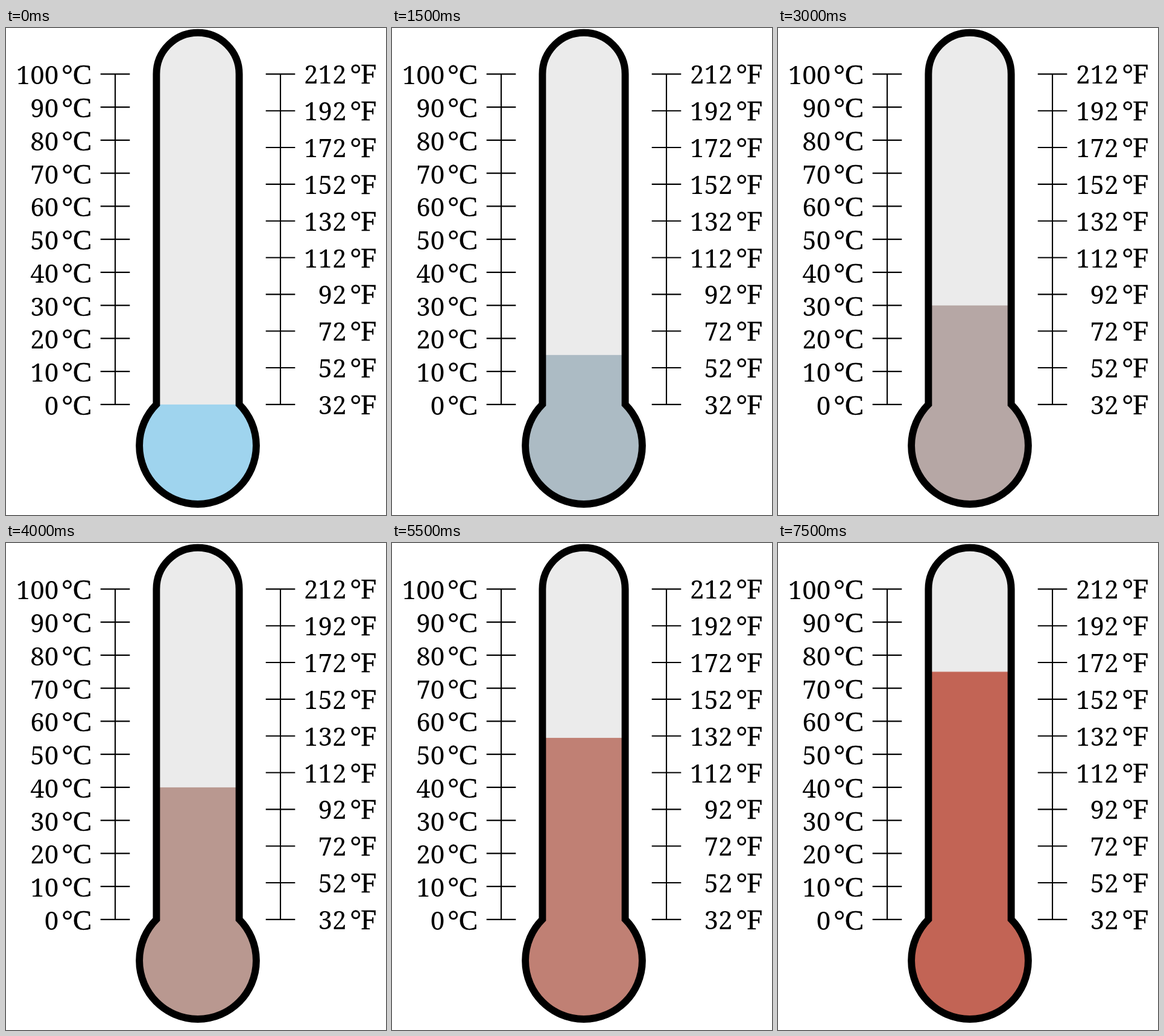
An HTML page without scripts for the animation above (8000 ms loop, 630 by 807 pixels).

```html
<!DOCTYPE html>
<html lang="en">
<head>
<meta charset="utf-8">
<title>Thermometer</title>
<style>
  html, body { margin: 0; width: 100%; height: 100%; overflow: hidden; background: #fff; }
  svg { display: block; width: 630px; height: 807px; }

  .labels { font: 42px "Noto Serif", serif; text-anchor: end; }
  .labels tspan { font: 46.5px "Liberation Serif", "Times New Roman", serif; stroke: #000; stroke-width: .6; }
  .scale { stroke: #000; stroke-width: 2.1; }
  .ticks { stroke-width: 48.6; }

  .liquid { animation: warm 8s -1ms infinite; }
  .level { animation: rise 8s -1ms steps(16) infinite; }

  /* 5 °C every half second */
  @keyframes rise { to { transform: translateY(-437.9px); } }

  @keyframes warm {
    0%      { fill: #9fd4ee; animation-timing-function: steps(3); }
    18.75%  { fill: #acbbc4; animation-timing-function: steps(3); }
    37.5%   { fill: #b6a7a5; animation-timing-function: steps(3); }
    56.25%  { fill: #bb9085; animation-timing-function: steps(2); }
    68.75%  { fill: #c08074; animation-timing-function: steps(2); }
    81.25%  { fill: #c27264; animation-timing-function: steps(2); }
    93.75%, 100% { fill: #c26455; animation-timing-function: steps(1); }
  }
</style>
</head>
<body>
<svg viewBox="0 0 630 807">
  <defs>
    <path id="glass" d="M249.4 623.6V76.4a68.6 68.6 0 0 1 137.2 0V623.6A96.9 96.9 0 1 1 249.4 623.6Z"/>
    <clipPath id="inside"><use href="#glass"/></clipPath>
  </defs>

  <use href="#glass" fill="#ebebeb"/>
  <g class="liquid" clip-path="url(#inside)">
    <rect class="level" x="210" y="623.9" width="216" height="640"/>
  </g>
  <use href="#glass" fill="none" stroke="#000" stroke-width="11.9"/>

  <g class="scale">
    <path d="M181 76.4V623.9M455 76.4V623.9"/>
    <path class="ticks" d="M181 75.35V625" stroke-dasharray="2.1 52.65"/>
    <path class="ticks" d="M455 75.35V625" stroke-dasharray="2.1 58.73"/>
  </g>

  <g class="labels">
    <text x="142" y="93.3">100<tspan dx="5.2">°C</tspan></text>
    <text x="142" y="148">90<tspan dx="5.2">°C</tspan></text>
    <text x="142" y="202.8">80<tspan dx="5.2">°C</tspan></text>
    <text x="142" y="257.5">70<tspan dx="5.2">°C</tspan></text>
    <text x="142" y="312.3">60<tspan dx="5.2">°C</tspan></text>
    <text x="142" y="367">50<tspan dx="5.2">°C</tspan></text>
    <text x="142" y="421.8">40<tspan dx="5.2">°C</tspan></text>
    <text x="142" y="476.5">30<tspan dx="5.2">°C</tspan></text>
    <text x="142" y="531.3">20<tspan dx="5.2">°C</tspan></text>
    <text x="142" y="586">10<tspan dx="5.2">°C</tspan></text>
    <text x="142" y="640.8">0<tspan dx="5.2">°C</tspan></text>
  </g>

  <g class="labels">
    <text x="614" y="92.3">212<tspan dx="6 -1">°F</tspan></text>
    <text x="614" y="153.1">192<tspan dx="6 -1">°F</tspan></text>
    <text x="614" y="214">172<tspan dx="6 -1">°F</tspan></text>
    <text x="614" y="274.8">152<tspan dx="6 -1">°F</tspan></text>
    <text x="614" y="335.6">132<tspan dx="6 -1">°F</tspan></text>
    <text x="614" y="396.5">112<tspan dx="6 -1">°F</tspan></text>
    <text x="614" y="457.3">92<tspan dx="6 -1">°F</tspan></text>
    <text x="614" y="518.1">72<tspan dx="6 -1">°F</tspan></text>
    <text x="614" y="579">52<tspan dx="6 -1">°F</tspan></text>
    <text x="614" y="639.8">32<tspan dx="6 -1">°F</tspan></text>
  </g>
</svg>
</body>
</html>
```
